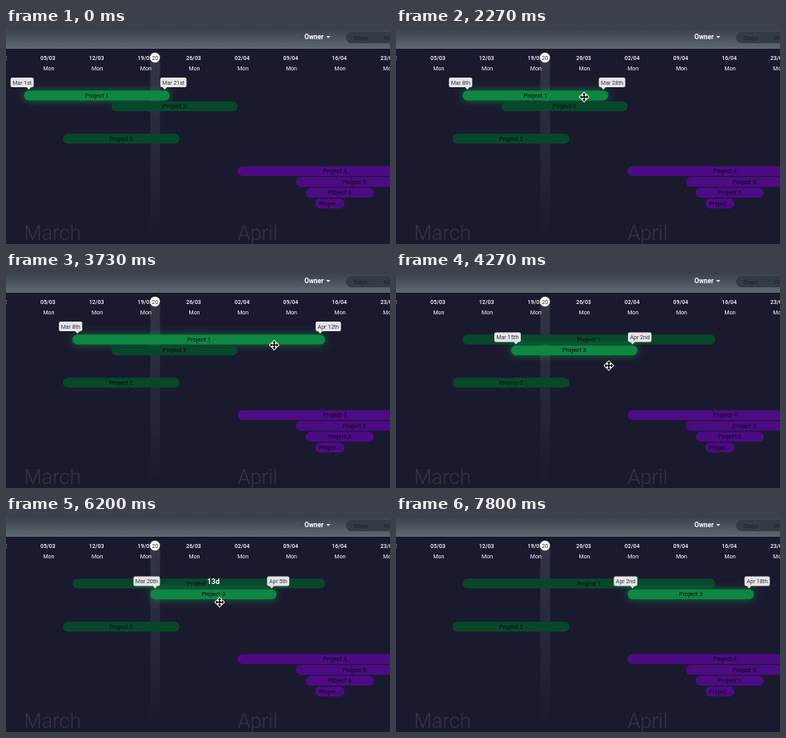
These frames come from a looping animation (480x270 px, 8 s). An HTML page with a canvas:

```html
<!DOCTYPE html>
<html lang="en">
<head>
<meta charset="utf-8">
<title>Timeline</title>
<style>
html, body { margin: 0; width: 100%; height: 100%; overflow: hidden; background: #1a1a2e; }
canvas { display: block; width: 480px; height: 270px; }
</style>
</head>
<body>
<canvas id="stage" width="480" height="270"></canvas>
<script>
const LOOP = 8000, LAG = 70, DAY = 12.14, MONDAY = 46.8, ROW = 13.5;
const GREEN = '#0d8742', DIM_GREEN = '#07482b', PURPLE = '#4d0b84';
const ctx = document.getElementById('stage').getContext('2d');

// Columns are working days, counted from Monday 5 March.
const dayX = i => MONDAY + i * DAY;
const rowY = r => 84.4 + r * ROW;

// Pointer strokes: start, end, and where each one comes to rest.
const strokes = [
  [150, 800, 107, 87], [930, 1250, 168, 87],
  [1870, 2500, 264, 86], [2670, 3230, 392, 86],
  [3560, 3950, 253, 99], [4000, 4170, 266, 117],
  [4400, 4860, 232, 100], [4900, 5300, 244, 102],
  [5470, 6300, 268, 108], [6300, 6980, 380, 110],
  [7300, 7720, -12, 234]
];

// The times during which a bar is held.
const MOVE = [930, 1250], STRETCH = [2670, 3230], NUDGE = [4000, 4170], SLIDE = [4900, 6980];

const clamp = (v, lo = 0, hi = 1) => Math.max(lo, Math.min(hi, v));
const ease = u => u * u * (3 - 2 * u);

function pointer(t) {
  let x = -12, y = 106;
  for (const [from, to, endX, endY] of strokes) {
    const e = ease(clamp((t - from) / (to - from)));
    x += (endX - x) * e;
    y += (endY - y) * e;
  }
  return { x, y };
}

// Whole days by which a held bar has followed the pointer.
function dragged([from, to], t) {
  const travel = pointer(clamp(t - LAG, from, to)).x - pointer(from).x;
  return Math.round(travel / DAY);
}

const holdAlpha = ([from, to], t) => clamp((t - from) / 100) * clamp((to + 95 - t) / 95);

function dateLabel(i) {
  const week = Math.floor(i / 5), day = 5 + week * 7 + i - week * 5;
  const d = day > 31 ? day - 31 : day;
  const suffix = d > 10 && d < 14 ? 'th' : ['th', 'st', 'nd', 'rd'][d % 10] || 'th';
  return (day > 31 ? 'Apr ' : 'Mar ') + d + suffix;
}

function text(str, x, y, size, color, weight = 400, align = 'center') {
  ctx.font = `${weight} ${size}px Roboto, sans-serif`;
  ctx.textAlign = align;
  ctx.fillStyle = color;
  ctx.fillText(str, x, y);
}

function pill(x, y, w, h, r, color) {
  ctx.fillStyle = color;
  ctx.beginPath();
  ctx.roundRect(x, y, w, h, r);
  ctx.fill();
}

function triangle(x, y, half, height) {
  ctx.beginPath();
  ctx.moveTo(x - half, y);
  ctx.lineTo(x + half, y);
  ctx.lineTo(x, y + height);
  ctx.fill();
}

function bar(name, first, last, row, color, active) {
  const x = dayX(first), w = (last + 1 - first) * DAY, y = rowY(row);
  ctx.save();
  if (active) {
    ctx.shadowColor = 'rgba(14,150,70,.7)';
    ctx.shadowBlur = 10;
  }
  pill(x, y - 6.1, w, 12.2, 6.1, color);
  ctx.restore();
  text(name, x + w / 2, y + 2.4, 7.5, '#05070b');
}

function tip(i, row, atStart) {
  const label = dateLabel(i), y = rowY(row) - 22.4, mid = dayX(i) + DAY / 2;
  ctx.font = '400 7px Roboto, sans-serif';
  const w = ctx.measureText(label).width + 5;
  const x = atStart ? mid + 6 - w : mid - 5.7;
  pill(x, y, w, 12, 2, '#e6e6e9');
  triangle(mid, y + 11.8, 3, 3.2);
  text(label, x + w / 2, y + 8.5, 7, '#34343c');
}

function duration(str, first, last, row, alpha) {
  ctx.globalAlpha = alpha;
  text(str, (dayX(first) + dayX(last + 1)) / 2, rowY(row) - 12.6, 9, '#fff', 700);
  ctx.globalAlpha = 1;
}

function moveCursor({ x, y }) {
  ctx.save();
  ctx.translate(x, y);
  ctx.beginPath();
  for (let k = 0; k < 4; k++) {
    ctx.moveTo(-.7, 0);
    ctx.lineTo(-.7, -3);
    ctx.lineTo(-2.2, -3);
    ctx.lineTo(0, -5.4);
    ctx.lineTo(2.2, -3);
    ctx.lineTo(.7, -3);
    ctx.lineTo(.7, 0);
    ctx.closePath();
    ctx.rotate(Math.PI / 2);
  }
  ctx.strokeStyle = '#fff';
  ctx.lineWidth = 2;
  ctx.lineJoin = 'round';
  ctx.stroke();
  ctx.fillStyle = '#000';
  ctx.fill();
  ctx.restore();
}

function gradient(x0, y0, x1, y1, from, to) {
  const g = ctx.createLinearGradient(x0, y0, x1, y1);
  g.addColorStop(0, from);
  g.addColorStop(1, to);
  return g;
}

function header() {
  ctx.fillStyle = gradient(0, 0, 0, 26, '#384049', '#5e6972');
  ctx.fillRect(0, 0, 480, 26);
  ctx.fillStyle = '#11131d';
  ctx.fillRect(0, 26, 480, 1);
  text('Owner', 373, 13.8, 8.3, '#fff', 700, 'left');
  triangle(402.8, 10, 2.5, 2.8);
  pill(425, 5, 90, 14, 7, '#333b44');
  text('Days', 435, 14.6, 8, '#1b2128', 400, 'left');
  text('Weeks', 472, 14.6, 8, '#1b2128', 400, 'left');
}

function calendar() {
  text('March', 22.4, 265, 25.5, '#343444', 300, 'left');
  text('April', 289.4, 265, 25.5, '#343444', 300, 'left');
  ctx.fillStyle = gradient(0, 37, 0, 264, 'rgba(150,165,165,.2)', 'rgba(150,165,165,0)');
  ctx.fillRect(dayX(11), 37, DAY, 227);
  for (let week = -1; week < 8; week++) {
    const date = new Date(2018, 2, 5 + week * 7), x = dayX(week * 5) + 5.6;
    const [d, m] = [date.getDate(), date.getMonth() + 1].map(n => String(n).padStart(2, '0'));
    text(d + '/' + m, x, 39.5, 7, '#fff', 500);
    text('Mon', x + 1, 53.2, 7, '#fff');
  }
  ctx.fillStyle = '#fff';
  ctx.beginPath();
  ctx.arc(186.2, 37, 6.2, 0, Math.PI * 2);
  ctx.fill();
  text('20', 186.2, 39.5, 7, '#25252d');
}

function draw(t) {
  const shift = dragged(MOVE, t);
  const a0 = -2 + shift, a1 = 12 + shift + dragged(STRETCH, t);
  const c0 = 7 + dragged(NUDGE, t) + dragged(SLIDE, t), c1 = c0 + 12;
  const onThree = t >= 3900;
  const stretching = t >= STRETCH[0] && t < STRETCH[1] + 300;

  ctx.fillStyle = '#1a1a2e';
  ctx.fillRect(0, 0, 480, 270);
  header();
  calendar();

  bar('Project 2', 2, 13, 4, DIM_GREEN);
  bar('Project 4', 20, 39, 7, PURPLE);
  bar('Project 5', 26, 37, 8, PURPLE);
  bar('Project 6', 27, 33, 9, PURPLE);
  bar('Projec...', 28, 30, 10, PURPLE);
  bar('Project 1', a0, a1, 0, onThree ? DIM_GREEN : GREEN, !onThree);
  bar('Project 3', c0, c1, 1, onThree ? GREEN : DIM_GREEN, onThree);

  const [first, last, row] = onThree ? [c0, c1, 1] : [a0, a1, 0];
  if (!stretching) tip(first, row, true);
  tip(last, row, false);

  duration('15d', a0, a1, 0, holdAlpha(MOVE, t));
  duration('13d', c0, c1, 1, holdAlpha(NUDGE, t) + holdAlpha(SLIDE, t));
  moveCursor(pointer(t));
}

const start = performance.now();
function tick() {
  draw((performance.now() - start) % LOOP);
  requestAnimationFrame(tick);
}
tick();
</script>
</body>
</html>
```
